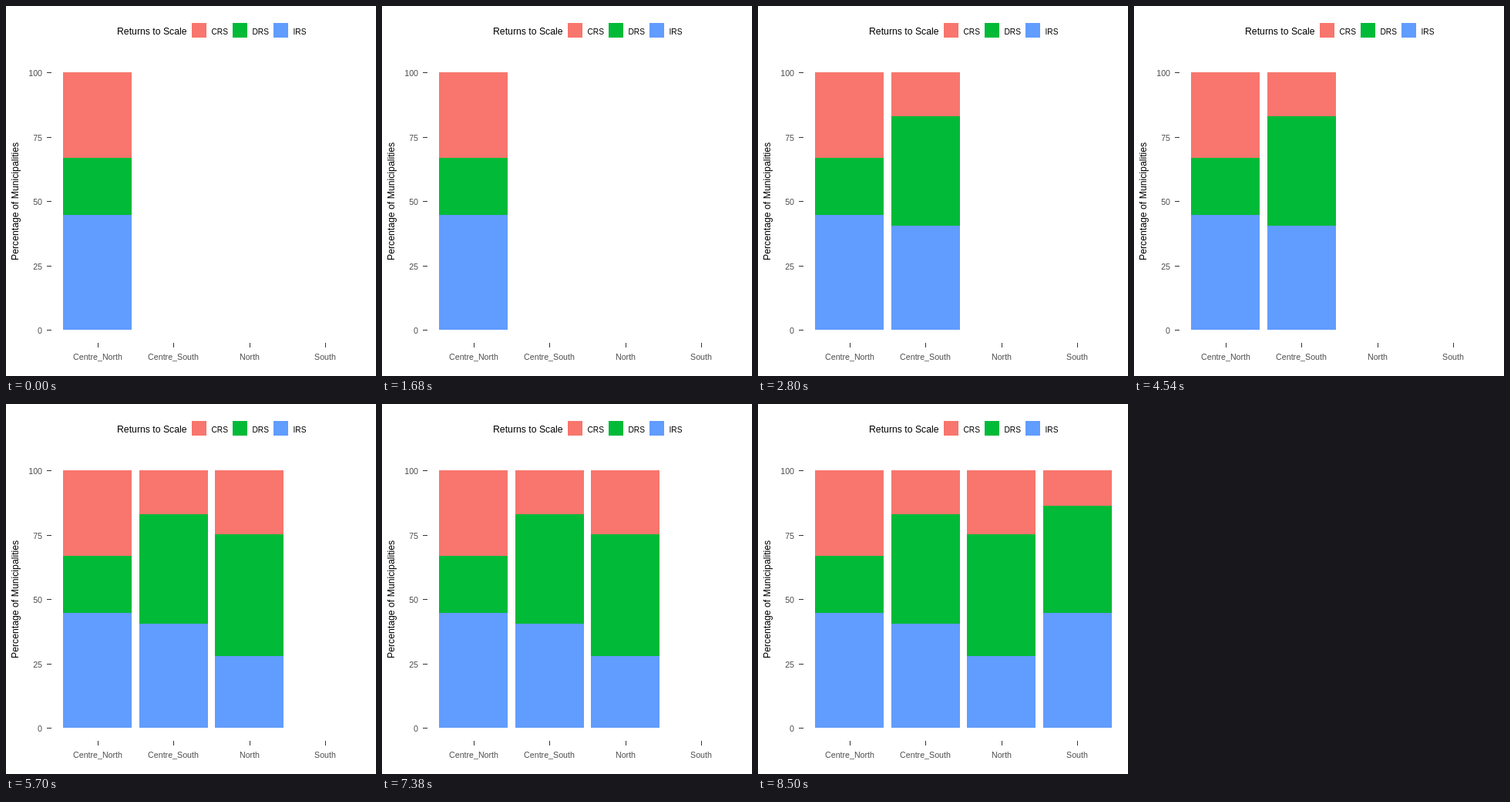
An HTML page for the animation above (10000 ms loop, 480 by 480 pixels).

```html
<!DOCTYPE html>
<html lang="en">
<head>
<meta charset="utf-8">
<title>Returns to Scale</title>
<style>
html, body { margin: 0; width: 100%; height: 100%; overflow: hidden; background: #fff; }
svg { display: block; width: 100%; height: 100%; }
text { font-family: "Liberation Sans", Arial, sans-serif; font-size: 10.67px; fill: #4d4d4d; }
.title { font-size: 12.25px; fill: #000; }
.key { font-size: 10.2px; fill: #000; }
rect { shape-rendering: crispEdges; }
</style>
</head>
<body>
<svg id="chart" viewBox="0 0 480 480">
  <text class="title" x="144" y="37">Returns to Scale</text>
  <text class="title" transform="translate(16 330) rotate(-90)">Percentage of Municipalities</text>
</svg>
<script>
const LOOP = 10000, TOP = 86, BASE = 420, BAR = 89;
const keys = [["CRS", "#f8766d"], ["DRS", "#00ba38"], ["IRS", "#619cff"]];
// Edges are the y positions where the colour changes.
const bars = [
  { name: "Centre_North", x: 74, edges: [197, 271], start: 0 },
  { name: "Centre_South", x: 173, edges: [143, 285], start: 2800 },
  { name: "North", x: 271, edges: [169, 327], start: 5700 },
  { name: "South", x: 370, edges: [132, 271], start: 8500 }
];
const chart = document.getElementById("chart");

function add(parent, tag, attrs, text = "") {
  const el = document.createElementNS("http://www.w3.org/2000/svg", tag);
  for (const name in attrs) el.setAttribute(name, attrs[name]);
  el.textContent = text;
  return parent.appendChild(el);
}

function rect(parent, x, y, width, height, fill = "#333") {
  add(parent, "rect", { x, y, width, height, fill });
}

keys.forEach(([label, color], i) => {
  const x = 241 + 53 * i;
  rect(chart, x, 22, 19, 19, color);
  add(chart, "text", { class: "key", x: x + 25.5, y: 36.5 }, label);
});

for (let value = 0; value <= 100; value += 25) {
  const y = Math.round(BASE - (BASE - TOP) * value / 100);
  rect(chart, 53, y, 6, 1);
  add(chart, "text", { x: 47, y: y + 4.5, "text-anchor": "end" }, value);
}

for (const bar of bars) {
  const mid = bar.x + Math.floor(BAR / 2) + (bar.x === 74 || bar.x === 271 ? 1 : 0);
  rect(chart, mid, 437, 1, 6);
  add(chart, "text", { x: mid, y: 459, "text-anchor": "middle" }, bar.name);
  bar.group = add(chart, "g", {});
  const ys = [TOP, ...bar.edges, BASE];
  keys.forEach(([, color], i) => rect(bar.group, bar.x, ys[i], BAR, ys[i + 1] - ys[i], color));
}

function draw(now) {
  const time = now % LOOP;
  for (const bar of bars) bar.group.style.display = time >= bar.start ? "" : "none";
  requestAnimationFrame(draw);
}
draw(performance.now());
</script>
</body>
</html>
```
